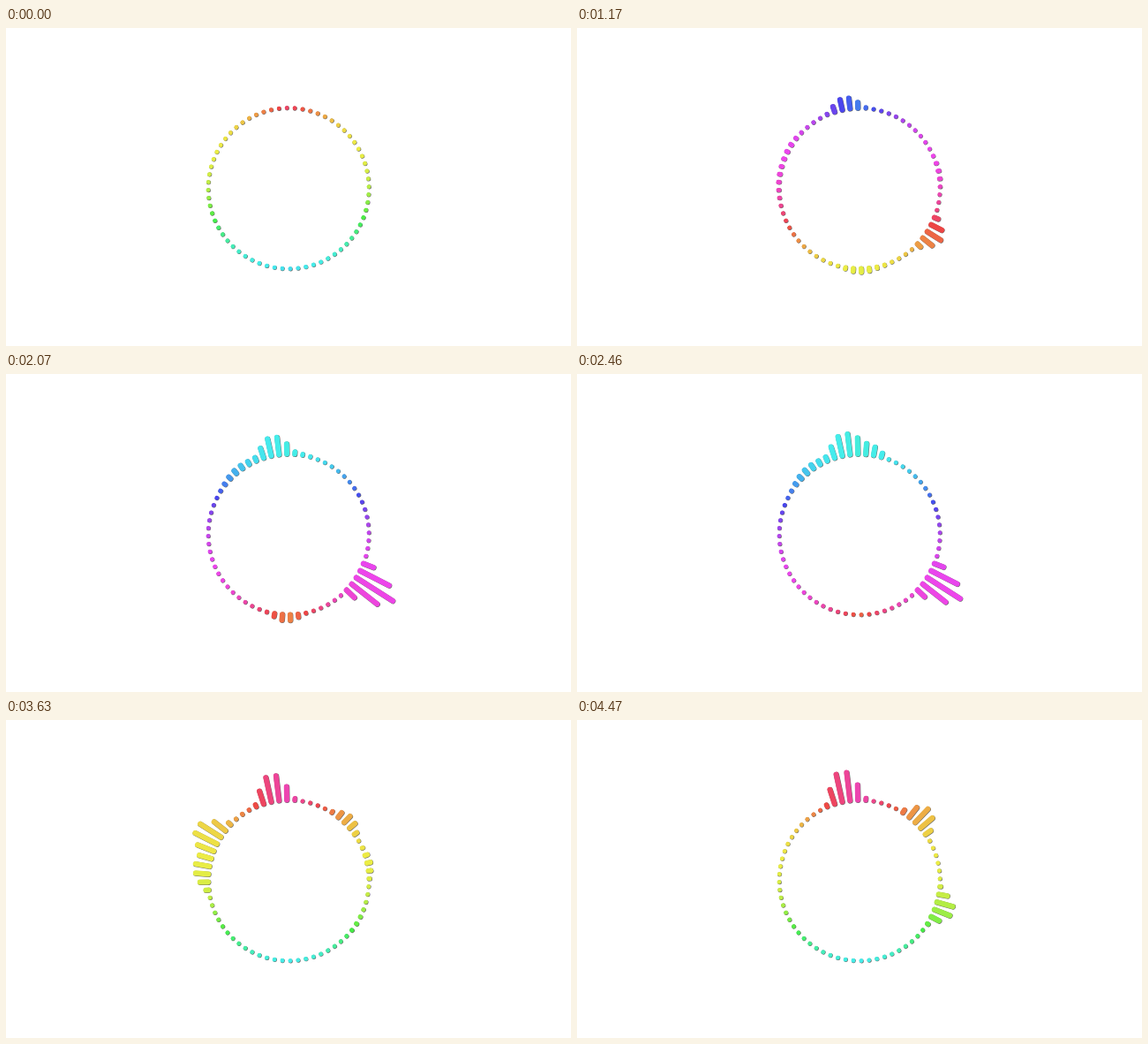
An HTML page with a canvas that plays this animation: 640x360 px, repeating every 4500 ms.

```html
<!DOCTYPE html>
<html lang="en">
<head>
<meta charset="utf-8">
<title>Sound ring</title>
<style>
  html, body { margin: 0; width: 100%; height: 100%; overflow: hidden; background: #fff; }
  canvas { display: block; width: 640px; height: 360px; }
</style>
</head>
<body>
<canvas id="stage" width="640" height="360"></canvas>
<script>
const ctx = document.getElementById('stage').getContext('2d');
const LOOP = 4500, STEP = 30, BARS = 64, BEAT = 540;
const CX = 320, CY = 181.5, RADIUS = 91;
const HUE_SPAN = 205;

const clamp = v => Math.max(0, Math.min(1, v));
const ease = k => k * k * (3 - 2 * k);
const rad = deg => deg * Math.PI / 180;

// Rises from 0 to 1 and falls back between two times.
const swell = (t, from, to) => Math.sin(Math.PI * clamp((t - from) / (to - from))) ** 2;

// A hump of neighbouring bars; the centre is counted clockwise from the top.
const hump = (centre, level, from, to, reach = 3) => ({
  centre, reach, height: t => level * swell(t, from, to)
});

// The top group creeps up after the first beat and kicks once in every beat.
const kick = {
  centre: -1.5,
  reach: 3,
  height: t => Math.max(34 * Math.sqrt(clamp((t - 660) / 3810)), 78 * swell(t % BEAT, 150, 300))
};

const humps = [
  kick,
  hump(1.3, 15, 1900, 3650),
  hump(-6.2, 5, 1000, 4000, 5),
  // opening chord
  hump(14.2, 11, 0, 1320),
  hump(30.7, 12, 0, 1320),
  hump(-10, 9, 0, 1320),
  hump(-13.5, 11, 0, 1320, 6),
  // long middle part
  hump(32.5, 20, 1000, 2330),
  hump(22, 49, 500, 3750),
  hump(14, 24, 2500, 3800),
  // closing part, cut off by the loop
  hump(-10.4, 29, 2700, 4450),
  hump(-14.2, 19, 3150, 4450, 4),
  hump(31.5, 43, 3630, 4350),
  hump(8.2, 21, 2900, 6000),
  hump(19.5, 20, 3700, 5200)
];

// Hue at the top of the ring.
const topHue = [[0, 352], [660, 278], [1680, 176], [2460, 162], [3150, 204], [3630, 334], [LOOP, 334]];

function track(points, t) {
  const i = points.findIndex(p => p[0] > t);
  const [t0, a] = points[i - 1], [t1, b] = points[i];
  return a + (b - a) * ease((t - t0) / (t1 - t0));
}

// Lingers on cyan, magenta and yellow.
const linger = hue => hue + 14 * Math.sin(rad(hue * 3));

function barHeight(i, t) {
  let sum = 0;
  for (const { centre, reach, height } of humps) {
    const gap = Math.abs(i - centre);
    const d = Math.min(gap, BARS - gap);
    if (d < reach) sum += height(t) * Math.cos(Math.PI * d / (2 * reach)) ** 2;
  }
  return sum;
}

function line(x0, y0, x1, y1, width, colour) {
  ctx.lineWidth = width;
  ctx.strokeStyle = colour;
  ctx.beginPath();
  ctx.moveTo(x0, y0);
  ctx.lineTo(x1, y1);
  ctx.stroke();
}

function draw(t) {
  const base = track(topHue, t);
  ctx.fillStyle = '#fff';
  ctx.fillRect(0, 0, 640, 360);
  ctx.lineCap = 'round';

  for (let n = 0; n < BARS; n++) {
    const i = n - BARS / 2 + 1;
    const height = barHeight(i, t);
    const angle = rad(i * 360 / BARS - 1.2);
    const sin = Math.sin(angle), cos = Math.cos(angle);
    const tip = RADIUS + height + 0.05;
    const x0 = CX + RADIUS * sin, y0 = CY - RADIUS * cos;
    const x1 = CX + tip * sin, y1 = CY - tip * cos;

    // Runs from top to bottom, the same on both sides.
    const hue = linger(base + HUE_SPAN * Math.acos(cos) / Math.PI);
    const width = Math.min(6, 4.8 + height * 0.3);

    line(x0 + 0.4, y0 + 0.4, x1 + 0.4, y1 + 0.4, width + 0.2, 'rgba(0, 0, 0, 0.6)');
    line(x0, y0, x1, y1, width, `hsl(${hue % 360}, 82%, 60%)`);
  }
}

const start = performance.now();
function tick() {
  const t = (performance.now() - start) % LOOP;
  draw(Math.floor(t / STEP) * STEP);
  requestAnimationFrame(tick);
}
tick();
</script>
</body>
</html>
```
